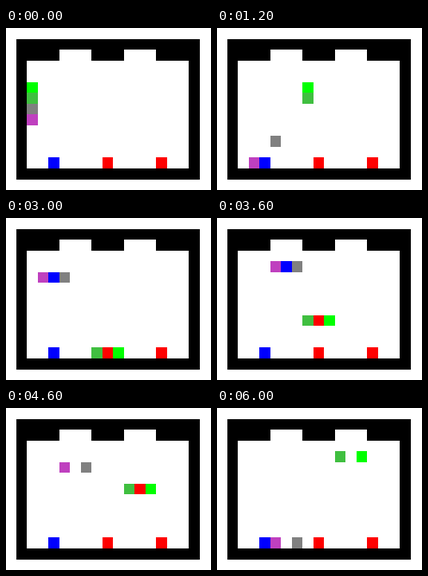
Animation, 257 px wide and 203 px high, one loop 6200 ms. Source, as an HTML page with a canvas:

```html
<!DOCTYPE html>
<html>
<head>
<meta charset="utf-8">
<title>Grid agents</title>
<style>
html, body { margin: 0; width: 257px; height: 203px; overflow: hidden; background: #fff; }
canvas { display: block; }
</style>
</head>
<body>
<canvas id="stage" width="257" height="203"></canvas>
<script>
const ctx = document.getElementById('stage').getContext('2d');
const STEP = 200, STEPS = 31, PITCH = 13.53;
const BLUE = '#00f', RED = '#f00';
const MOVES = { R: [1, 0], L: [-1, 0], D: [0, 1], U: [0, -1], W: [0, 0] };

const px = c => Math.floor(13.02 + c * PITCH);
const py = r => Math.floor(14.12 + r * PITCH);

function cells(color, col, row, w = 1, h = 1) {
  const x = px(col), y = py(row);
  ctx.fillStyle = color;
  ctx.fillRect(x, y, px(col + w) - x, py(row + h) - y);
}

// Routes are runs of a direction and a count; W waits in place.
const agents = [
  { color: '#0f0', start: [1, 4], route: 'R8 D7 U5 R3 U5 D2' },
  { color: '#40bf40', start: [1, 5], route: 'R6 D6 W3 U5 R3 U5 D2' },
  { color: '#808080', start: [1, 6], route: 'R3 D5 U7 R2 U3 D10' },
  { color: '#bf40bf', start: [1, 7], route: 'R1 D4 W3 U7 R2 U3 D10' }
];

for (const a of agents) {
  let [c, r] = a.start;
  a.path = [[c, r]];
  for (const run of a.route.split(' ')) {
    const [dx, dy] = MOVES[run[0]];
    for (let n = +run.slice(1); n > 0; n--) {
      a.path.push([c += dx, r += dy]);
    }
  }
}

// Boxes ride just to the right of the agent holding their left side.
const boxes = [
  { color: BLUE, holder: agents[3], from: 8, to: 20 },
  { color: RED, holder: agents[1], from: 15, to: 28 }
];

function draw(step) {
  ctx.fillStyle = '#fff';
  ctx.fillRect(0, 0, 257, 203);
  cells('#000', 0, 0, 17, 13);
  cells('#fff', 1, 2, 15, 10);
  cells('#fff', 4, 1, 3);
  cells('#fff', 10, 1, 3);

  cells(BLUE, 3, 11);
  cells(RED, 8, 11);
  cells(RED, 13, 11);

  for (const b of boxes) {
    if (step >= b.from && step < b.to) {
      const [c, r] = b.holder.path[step];
      cells(b.color, c + 1, r);
    }
  }
  for (const a of agents) cells(a.color, ...a.path[step]);
}

const begin = performance.now();
function tick() {
  const t = Math.max(0, performance.now() - begin);
  draw(Math.floor(t / STEP) % STEPS);
  requestAnimationFrame(tick);
}
tick();
</script>
</body>
</html>
```
